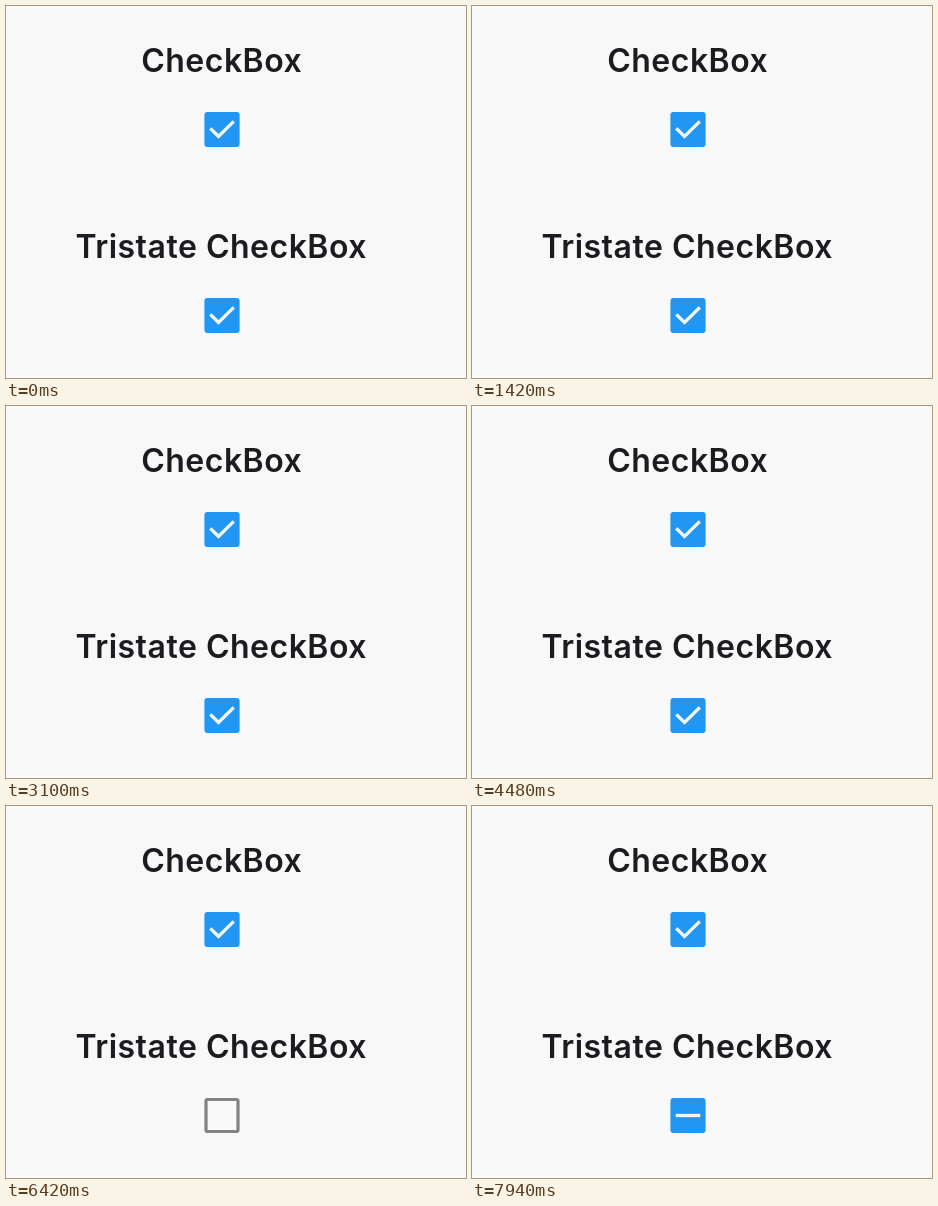
An HTML page for the animation above (8000 ms loop, 460x372 px).

```html
<!DOCTYPE html>
<html lang="en">
<head>
<meta charset="utf-8">
<title>CheckBox states</title>
<style>
  html, body { margin: 0; width: 100%; height: 100%; overflow: hidden; background: #f8f8f8; }
  svg { display: block; width: 460px; height: 372px; }
  text { font: 600 32px Inter, "Open Sans", sans-serif; letter-spacing: .5px; text-anchor: middle; fill: #1b1b20; }
  .fill { fill: #2196f3; }
  .mark { fill: none; stroke: #f5f8fb; stroke-width: 3.3; stroke-linecap: square; }
</style>
</head>
<body>
<svg viewBox="0 0 460 372">
  <defs>
    <rect id="box" class="fill" x="-17.6" y="-17.6" width="35.2" height="35.2" rx="3"/>
    <g id="checked">
      <use href="#box"/>
      <path class="mark" d="M-10.6 0 L-3.5 7 L10.6 -7"/>
    </g>
  </defs>

  <text x="215.7" y="66">CheckBox</text>
  <use href="#checked" x="216" y="123.5"/>

  <text x="215.2" y="252">Tristate CheckBox</text>
  <g transform="translate(216 309.5)">
    <circle id="ripple" fill="#1b1b20"/>
    <rect id="empty" x="-16" y="-16" width="32" height="32" rx="1.5" fill="none" stroke="#838386" stroke-width="3.2"/>
    <use id="on" href="#checked"/>
    <g id="mixed">
      <use href="#box"/>
      <path id="dash" class="mark"/>
    </g>
  </g>
</svg>
<script>
const LOOP = 8000;
const HOLD = 90;                    // press to release of a tap
const UNCHECK = 4930, MIX = 7040;   // release times
const $ = id => document.getElementById(id);
const ramp = (t, start, length) => Math.min(1, Math.max(0, (t - start) / length));
const easeOut = p => 1 - (1 - p) ** 3;

function drawRipple(t) {
  const press = (t < 6000 ? UNCHECK : MIX) - HOLD;
  const grow = easeOut(ramp(t, press, 225));
  const opacity = ramp(t, press, 75) * (1 - ramp(t, press + 225, 150));
  $("ripple").setAttribute("r", 35.2 * (0.3 + 0.7 * grow));
  $("ripple").setAttribute("opacity", 0.11 * opacity);
}

function draw(t) {
  const off = ramp(t, UNCHECK, 100);
  const mixed = ramp(t, MIX, 50);
  const dashEnd = -10.6 + 21.2 * easeOut(ramp(t, MIX, 100));
  $("on").setAttribute("opacity", 1 - off);
  $("mixed").setAttribute("opacity", mixed);
  $("empty").setAttribute("opacity", off * (1 - mixed));
  $("dash").setAttribute("d", `M-10.6 0 H${dashEnd}`);
  drawRipple(t);
}

const start = performance.now();
function tick() {
  draw((performance.now() - start) % LOOP);
  requestAnimationFrame(tick);
}
tick();
</script>
</body>
</html>
```
